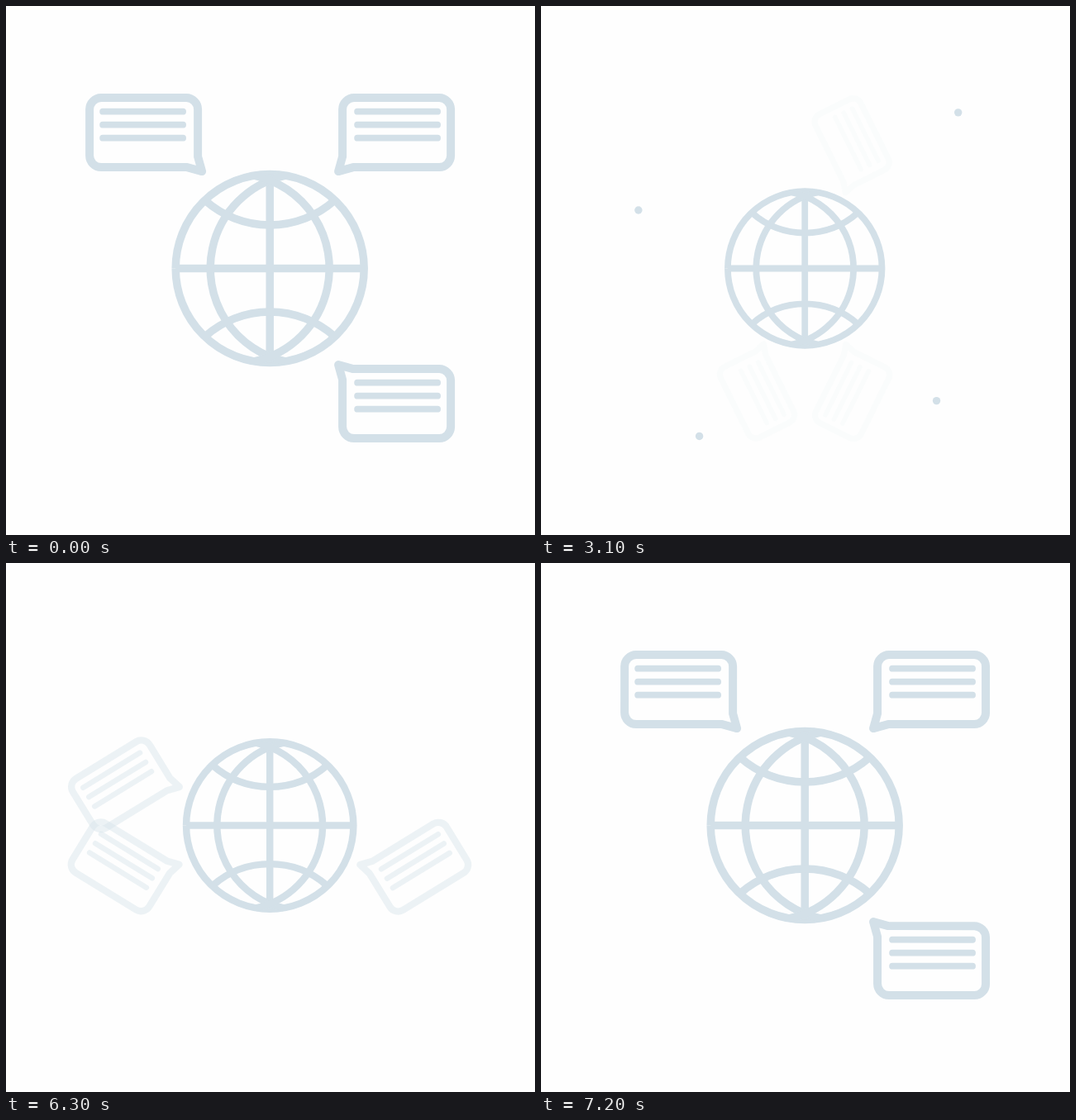
Write an HTML page with a canvas that moves like this. It is 640 by 640 pixels and loops after 9.6 s.

```html
<!DOCTYPE html>
<html>
<head>
<meta charset="utf-8">
<style>
html, body { margin: 0; height: 100%; overflow: hidden; background: #fefefe; }
canvas { display: block; }
</style>
</head>
<body>
<canvas id="stage" width="640" height="640"></canvas>
<script>
const ctx = document.getElementById('stage').getContext('2d');
const LOOP = 9600, STEP = 100, HALF = 620;
const CX = 319.2, CY = 317.5, INK = '#d3e0e8', PAPER = '#fefefe';
const RAD = Math.PI / 180, SIDES = [-1, 1];

// Final spark positions, relative to the globe centre.
const sparks = [
  [[-254, -89], [234, -238], [201, 202], [-161, 256]],
  [[-202, -231], [-17, -283], [276, 215], [19, 256]]
];

const clamp = v => Math.min(1, Math.max(0, v));
const smooth = v => { v = clamp(v); return v * v * (3 - 2 * v); };

function arc(x, y, radius, middle, spread) {
  ctx.beginPath();
  ctx.arc(x, y, radius, middle - spread, middle + spread);
  ctx.stroke();
}

function line(x1, y1, x2, y2) {
  ctx.beginPath();
  ctx.moveTo(x1, y1);
  ctx.lineTo(x2, y2);
  ctx.stroke();
}

function globe(scale) {
  ctx.save();
  ctx.translate(CX, CY);
  ctx.scale(scale, scale);
  ctx.lineWidth = 9.5;
  arc(0, 0, 114, 0, Math.PI);
  line(-114, 0, 114, 0);
  line(0, -114, 0, 114);
  for (const side of SIDES) {
    arc(-43 * side, 0, 115, side > 0 ? 0 : Math.PI, 1.36);
    arc(0, 170.5 * side, 118, -side * Math.PI / 2, 0.722);
  }
  ctx.restore();
}

// A rounded box with its tail at the lower right.
function box(w, h, radius) {
  ctx.beginPath();
  ctx.moveTo(w, h - 13);
  ctx.arcTo(w, -h, -w, -h, radius);
  ctx.arcTo(-w, -h, -w, h, radius);
  ctx.arcTo(-w, h, w, h, radius);
  ctx.lineTo(w - 13, h);
  ctx.lineTo(w + 5, h + 5);
  ctx.closePath();
  ctx.stroke();
}

function bubble(sx, sy, shift, angle, away) {
  const scale = 1 - 0.3 * away;
  ctx.save();
  ctx.globalAlpha = 1 - away;
  ctx.lineCap = ctx.lineJoin = 'round';
  ctx.translate(CX, CY);
  ctx.rotate(sx * sy * angle * away * RAD);
  ctx.scale(scale, scale);
  ctx.translate(153 * sx + shift, 164 * sy - shift);

  ctx.save();
  ctx.scale(-sx, -sy);
  ctx.lineWidth = 10;
  box(65.5, 42, 14);
  ctx.restore();

  ctx.lineWidth = 7.8;
  for (let row = -1; row <= 1; row++) {
    const y = row * 16 - 9.4;
    line(sx - 48.5, y, sx + 48.5, y);
  }
  ctx.restore();
}

// Three of the four corners hold a bubble; the empty one alternates.
function bubbles(set, angle, away) {
  if (away >= 1) return;
  const empty = set ? 1 : -1;
  for (const sx of SIDES)
    for (const sy of SIDES)
      if (sx !== empty || sy !== -empty) bubble(sx, sy, -0.4 * empty, angle, away);
}

function burst(points, local) {
  const p = 1 - (1 - clamp((local - 500) / 490)) ** 3;
  if (p === 0) return;
  ctx.globalAlpha = clamp((1100 - local) / 200);
  for (const [x, y] of points) {
    ctx.beginPath();
    ctx.arc(CX + x * p, CY + y * p, 4.7, 0, 2 * Math.PI);
    ctx.fill();
  }
  ctx.globalAlpha = 1;
}

function draw(now) {
  const t = Math.floor((now % LOOP) / STEP) * STEP;
  const turn = t < 4800 ? 0 : 1;
  const local = t - (turn ? 6000 : 2400);
  const u = local < 0 ? 0 : (local + 36) / HALF;
  const leave = smooth(u), enter = smooth(u - 1);

  ctx.fillStyle = PAPER;
  ctx.fillRect(0, 0, 640, 640);
  ctx.fillStyle = ctx.strokeStyle = INK;
  bubbles(turn, -56, leave);
  bubbles(1 - turn, 70, 1 - enter);
  burst(sparks[turn], local);
  globe(1 - 0.2 * (leave - enter));
}

const start = performance.now();
function tick() {
  draw(performance.now() - start);
  requestAnimationFrame(tick);
}
tick();
</script>
</body>
</html>
```
